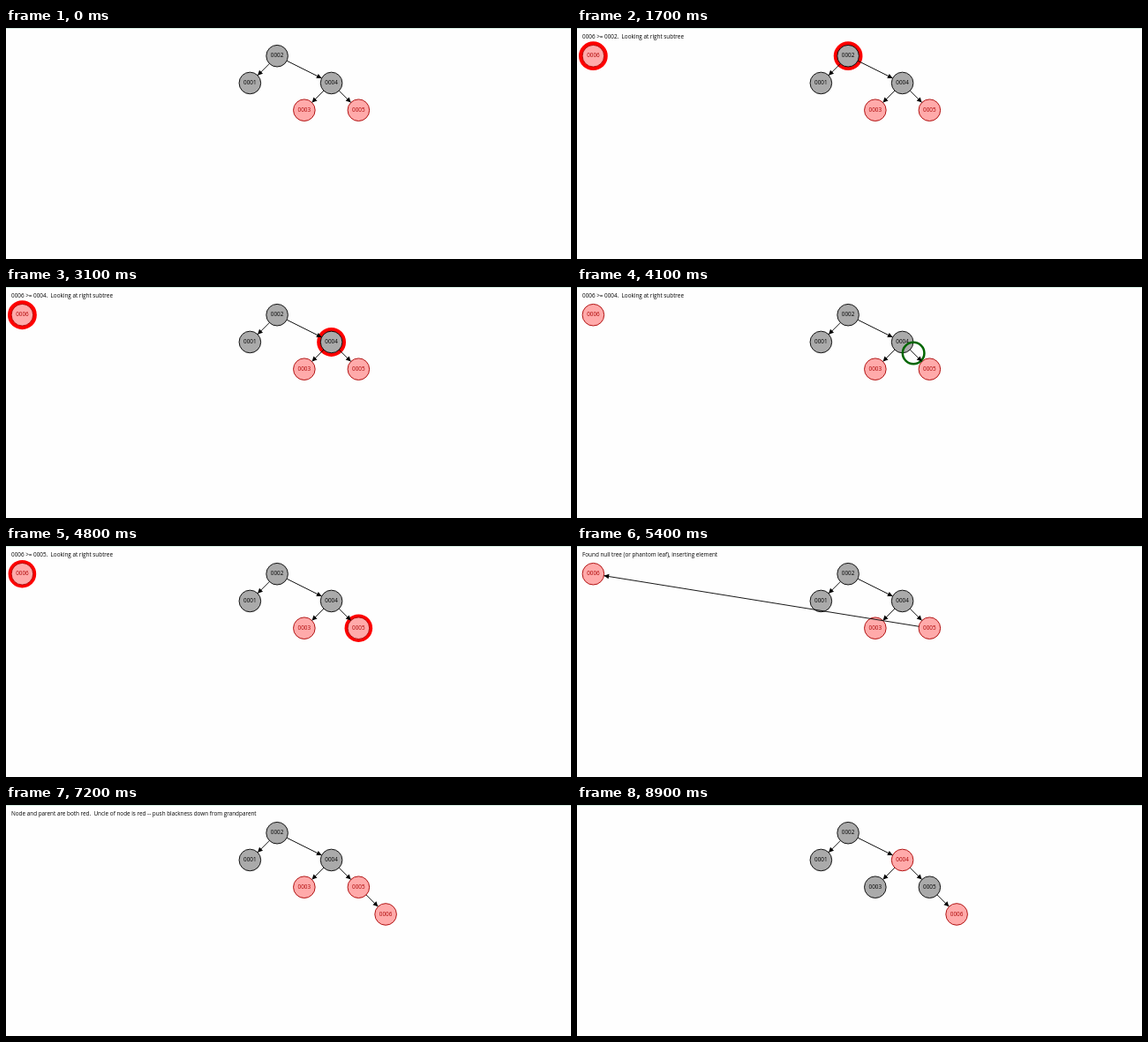
An HTML page with a canvas that plays this animation: 640x262 px, repeating every 9000 ms.

```html
<!DOCTYPE html>
<html lang="en">
<head>
<meta charset="utf-8">
<title>Red-black tree insertion</title>
<style>
  html, body { margin: 0; width: 100%; height: 100%; overflow: hidden; background: #fefefe; }
  canvas { display: block; width: 640px; height: 262px; }
</style>
</head>
<body>
<canvas id="stage"></canvas>
<script>
const WIDTH = 640, HEIGHT = 262, LOOP = 9000, TICK = 100;
const RADIUS = 12.3;
const FONT = '6.35px "Open Sans", sans-serif';
const RED = { line: '#aa0000', fill: '#ffaaaa' };
const BLACK = { line: '#000000', fill: '#aaaaaa' };

const canvas = document.getElementById('stage');
const ctx = canvas.getContext('2d');
const ratio = window.devicePixelRatio || 1;
canvas.width = WIDTH * ratio;
canvas.height = HEIGHT * ratio;

// Tree slots lie on a regular grid.
const slot = (col, row) => ({ x: 307.1 + 30.75 * col, y: 31.7 + 30.75 * row });
const places = {
  '0001': slot(-1, 1), '0002': slot(0, 0), '0003': slot(1, 2),
  '0004': slot(2, 1), '0005': slot(3, 2), '0006': slot(4, 3)
};
const waiting = { x: 18.4, y: 31.7 };
const links = [['0002', '0001'], ['0002', '0004'], ['0004', '0003'], ['0004', '0005']];

const compare = key => `0006 >= ${key}.  Looking at right subtree`;
const steps = [
  { at: 0, text: '' },
  { at: 100, text: 'Inserting 0006' },
  { at: 1100, text: compare('0002'), ring: '0002' },
  { at: 2000, text: compare('0002'), path: ['0002', '0004'] },
  { at: 2900, text: compare('0004'), ring: '0004' },
  { at: 3815, text: compare('0004'), path: ['0004', '0005'] },
  { at: 4600, text: compare('0005'), ring: '0005' },
  { at: 5400, text: 'Found null tree (or phantom leaf), inserting element' },
  { at: 7200, text: 'Node and parent are both red.  Uncle of node is red -- push blackness down from grandparent' },
  { at: 8900, text: '' }
];
const LINKED = 5400, RECOLORED = 8000, MOVE = 700;

const progress = (t, start) => Math.min(1, Math.max(0, (t - start) / MOVE));
const between = (a, b, k) => ({ x: a.x + (b.x - a.x) * k, y: a.y + (b.y - a.y) * k });

// Highlight width swells and shrinks as a triangle wave.
function pulse(t) {
  const period = 1900, phase = (t - 1440 + 2 * period) % period;
  return 1.85 + 3.05 * Math.abs(1 - 2 * phase / period);
}

function circle(p, r) {
  ctx.beginPath();
  ctx.arc(p.x, p.y, r, 0, Math.PI * 2);
}

function drawNode(key, p, tone, halo) {
  if (halo) {
    circle(p, RADIUS + halo);
    ctx.fillStyle = '#ff0000';
    ctx.fill();
  }
  circle(p, RADIUS);
  ctx.fillStyle = tone.fill;
  ctx.strokeStyle = tone.line;
  ctx.lineWidth = 0.9;
  ctx.fill();
  ctx.stroke();
  ctx.fillStyle = tone.line;
  ctx.textAlign = 'center';
  ctx.textBaseline = 'middle';
  ctx.fillText(key, p.x, p.y);
}

function drawLink(a, b) {
  const angle = Math.atan2(b.y - a.y, b.x - a.x);
  const length = Math.hypot(b.x - a.x, b.y - a.y);
  const tip = length - RADIUS;
  ctx.save();
  ctx.translate(a.x, a.y);
  ctx.rotate(angle);
  ctx.strokeStyle = ctx.fillStyle = '#000000';
  ctx.lineWidth = 0.85;
  ctx.beginPath();
  ctx.moveTo(RADIUS, 0);
  ctx.lineTo(tip, 0);
  ctx.stroke();
  ctx.beginPath();
  ctx.moveTo(tip, 0);
  ctx.lineTo(tip - 5.6, -2.8);
  ctx.lineTo(tip - 5.6, 2.8);
  ctx.closePath();
  ctx.fill();
  ctx.restore();
}

function toneOf(key, t) {
  const done = t >= RECOLORED;
  if (key === '0006') return RED;
  if (key === '0003' || key === '0005') return done ? BLACK : RED;
  return key === '0004' && done ? RED : BLACK;
}

function draw(t) {
  const step = steps.filter(s => s.at <= t).pop();
  const spots = { ...places, '0006': between(waiting, places['0006'], progress(t, LINKED)) };
  const lit = key => step.ring && (key === step.ring || key === '0006');

  ctx.setTransform(ratio, 0, 0, ratio, 0, 0);
  ctx.fillStyle = '#fefefe';
  ctx.fillRect(0, 0, WIDTH, HEIGHT);
  ctx.fillStyle = '#d6ede3';
  ctx.fillRect(0, 0, WIDTH, 1);
  ctx.font = FONT;

  const keys = Object.keys(spots).filter(key => key !== '0006' || t >= 100);
  keys.sort((a, b) => Number(!!lit(a)) - Number(!!lit(b)));
  for (const key of keys) drawNode(key, spots[key], toneOf(key, t), lit(key) ? pulse(t) : 0);

  if (step.path) {
    const [from, to] = step.path;
    circle(between(places[from], places[to], progress(t, step.at)), RADIUS);
    ctx.strokeStyle = '#006600';
    ctx.lineWidth = 2.5;
    ctx.stroke();
  }

  for (const [from, to] of links) drawLink(spots[from], spots[to]);
  if (t >= LINKED) drawLink(spots['0005'], spots['0006']);

  ctx.fillStyle = '#000000';
  ctx.textAlign = 'left';
  ctx.textBaseline = 'alphabetic';
  ctx.fillText(step.text, 6, 12.2);
}

const start = performance.now();
function frame() {
  const t = (performance.now() - start) % LOOP;
  draw(Math.floor(t / TICK) * TICK);
  requestAnimationFrame(frame);
}
frame();
</script>
</body>
</html>
```
